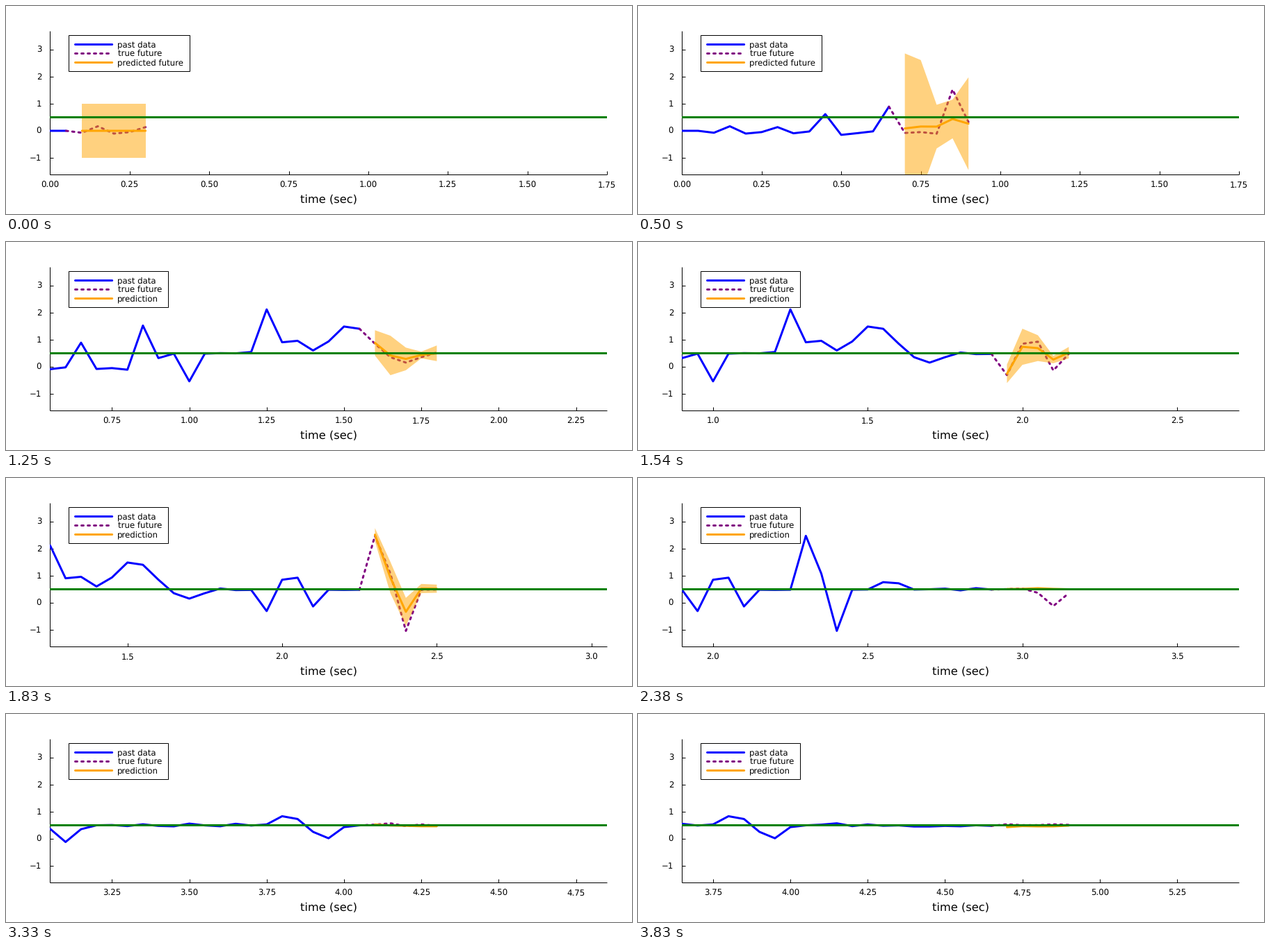
Write a matplotlib script that moves like this. It is 900 px wide and 300 px high and loops after 3870 ms.

```python
import matplotlib
import matplotlib.pyplot as plt
import numpy as np
from matplotlib.animation import FuncAnimation
from matplotlib.patches import Polygon, Rectangle

matplotlib.rcParams["font.family"] = "DejaVu Sans"
matplotlib.rcParams["text.hinting"] = "no_hinting"

DPI = 100
PT = 72 / DPI                      # points per pixel
LEFT, RIGHT, TOP, BOTTOM = 63.4, 864.0, 36, 243.2
ZERO, UNIT = 180.0, 39.0           # pixel row of 0, pixels per unit
DT, AHEAD, STEPS = 0.05, 5, 93
SCROLL = 19                        # step at which the window starts to move
TICKS, SMALL, LARGE = 387, 11.75, 16.3

# triangular kicks: centre (sample), half width, height
KICKS = [
    (9, 1, .56), (13, 1, 1.02), (17, 1, 1.41), (20, 1, -1.02),
    (25, 1, 1.68), (26.6, 1.6, .65), (30.4, 2.4, 1.2), (34, 2, -.35),
    (39, 1, -.8), (40.6, 1.5, .55), (42, 1, -.65), (46.2, 1.05, 2.45),
    (48, 1, -1.6), (51.5, 1, .5), (62, 1.3, -.65), (76.4, 1, .6),
    (78.8, 1.3, -.5),
]


def make_signal(count):
    """A level rising to 0.5, a fading ripple, faint noise and the kicks."""
    i = np.arange(count)
    level = np.interp(i, [8, 10, 16, 19], [0, -.08, -.08, .5])
    ripple = .18 * np.exp(-(i / 12) ** 2) * np.sin(2 * np.pi * (i - 2.2) / 2.95)
    ripple[:2] = 0
    noise = np.random.default_rng(4).normal(0, .03, count) * (i > SCROLL)
    kicks = sum(h * np.clip(1 - abs(i - c) / w, 0, 1) for c, w, h in KICKS)
    return level + ripple + noise + kicks


SIGNAL = make_signal(STEPS + AHEAD + 1)
TIME = DT * np.arange(len(SIGNAL))


def forecast(step):
    """Mean and half width for the next samples; the model learns over time."""
    h = np.arange(AHEAD)
    ramp = min(1, step / 12)
    truth = SIGNAL[step + 2:step + 2 + AHEAD]
    centre = np.interp(step, [0, 12, 20], [0, .2, .5])
    trust = np.interp(step, [0, 12, 30, 44, 57], [0, .4, .95, 1, .1])
    noise = np.random.default_rng(step).normal(0, .03 * ramp, AHEAD)
    mean = centre + trust * np.exp(-.3 * h) * (truth - centre) + noise

    spread = np.interp(step, [0, 12, 20, 30, 44, 57],
                       [1, 1.9, 1.9, .5, .45, .01])
    peak = .5 + (step - 12) / 32
    shape = (1 + .65 * np.cos(np.pi / 2 * (h - peak))) * np.exp(-.12 * h)
    return mean, spread * shape ** ramp


def row(v):
    return ZERO - UNIT * np.asarray(v)


def window(step):
    now = DT * (step + 1)
    return max(0, now - 1), max(1.75, now + .8)


def tick_values(step, lo, hi):
    def within(gap):
        first = int(np.ceil(lo / gap - 1e-6))
        last = int(np.floor(hi / gap + 1e-6))
        return gap * np.arange(first, last + 1)

    coarse = within(.5)
    if step >= SCROLL and len(coarse) >= 4:
        return coarse, 1
    return within(.25), 2


fig = plt.figure(figsize=(9, 3), dpi=DPI, facecolor="white")
ax = fig.add_axes([0, 0, 1, 1])
ax.set_xlim(0, 900)
ax.set_ylim(300, 0)
ax.axis("off")
frame = Rectangle((LEFT, TOP), RIGHT - LEFT, BOTTOM - TOP,
                  transform=ax.transData)


def label(x, y, text="", size=SMALL, ha="left", z=1):
    return ax.text(x, y, text, size=size * PT, ha=ha, va="baseline", zorder=z)


def thin(x, y):
    return ax.plot(x, y, color="black", lw=PT, zorder=1,
                   solid_capstyle="butt")[0]


def stroke(color, z, x=(), y=(), dashed=False, clip=True):
    line, = ax.plot(x, y, color=color, lw=3 * PT, zorder=z, snap=False,
                    ls=(0, (1, 2)) if dashed else "-",
                    solid_capstyle="round", dash_capstyle="round",
                    solid_joinstyle="round", dash_joinstyle="round")
    if clip:
        line.set_clip_path(frame)
    return line


# axes
thin([LEFT, LEFT], [TOP, BOTTOM])
thin([LEFT, RIGHT], [BOTTOM, BOTTOM])
for v in range(-1, 4):
    thin([LEFT, LEFT + 5], [row(v)] * 2)
    label(51.2, row(v) + 4.2, str(v).replace("-", "\u2212"), ha="right")
label(464, 283.8, "time (sec)", LARGE, "center")
marks = [thin([], []) for _ in range(8)]
mark_labels = [label(0, 261.4, ha="center") for _ in range(8)]

# series
past = stroke("blue", 2)
future = stroke("purple", 3, dashed=True)
band = Polygon(np.zeros((2 * AHEAD, 2)), facecolor="orange", alpha=.5,
               lw=0, zorder=4)
ax.add_patch(band)
band.set_clip_path(frame)
mean_line = stroke("orange", 5)
stroke("green", 6, [LEFT, RIGHT], [row(.5)] * 2)

# legend
box = ax.add_patch(Rectangle((90.2, 42.2), 174, 52, facecolor="white",
                             edgecolor="black", lw=PT, zorder=7))
for i, color in enumerate(["blue", "purple", "orange"]):
    stroke(color, 8, [99.5, 152.7], [55.5 + 13 * i] * 2,
           dashed=color == "purple", clip=False)
label(160, 59, "past data", z=8)
label(161.4, 72, "true future", z=8)
forecast_label = label(160, 85, z=8)

FORECASTS = [forecast(n) for n in range(STEPS)]


def update(tick):
    step = (10 * tick + 4) * 24 // 1000     # 24 steps per second
    lo, hi = window(step)

    def col(t):
        return LEFT + (np.asarray(t) - lo) / (hi - lo) * (RIGHT - LEFT)

    now, end = step + 1, step + 2 + AHEAD
    first = max(0, step - SCROLL - 1)
    past.set_data(col(TIME[first:now + 1]), row(SIGNAL[first:now + 1]))
    future.set_data(col(TIME[now:end]), row(SIGNAL[now:end]))

    mean, half = FORECASTS[step]
    x = col(TIME[now + 1:end])
    mean_line.set_data(x, row(mean))
    band.set_xy(np.column_stack([
        np.r_[x, x[::-1]],
        np.r_[row(mean + half), row(mean - half)[::-1]]]))

    values, digits = tick_values(step, lo, hi)
    for i, (mark, text) in enumerate(zip(marks, mark_labels)):
        shown = i < len(values)
        mark.set_visible(shown)
        text.set_visible(shown)
        if shown:
            c = col(values[i])
            mark.set_data([c, c], [BOTTOM - 5, BOTTOM])
            text.set_x(c)
            text.set_text(f"{values[i]:.{digits}f}")

    early = step < SCROLL
    forecast_label.set_text("predicted future" if early else "prediction")
    box.set_width(174 if early else 143)
    return []


anim = FuncAnimation(fig, update, frames=TICKS, interval=10,
                     init_func=lambda: update(0), repeat=True,
                     repeat_delay=0, cache_frame_data=False)
plt.show()
```
